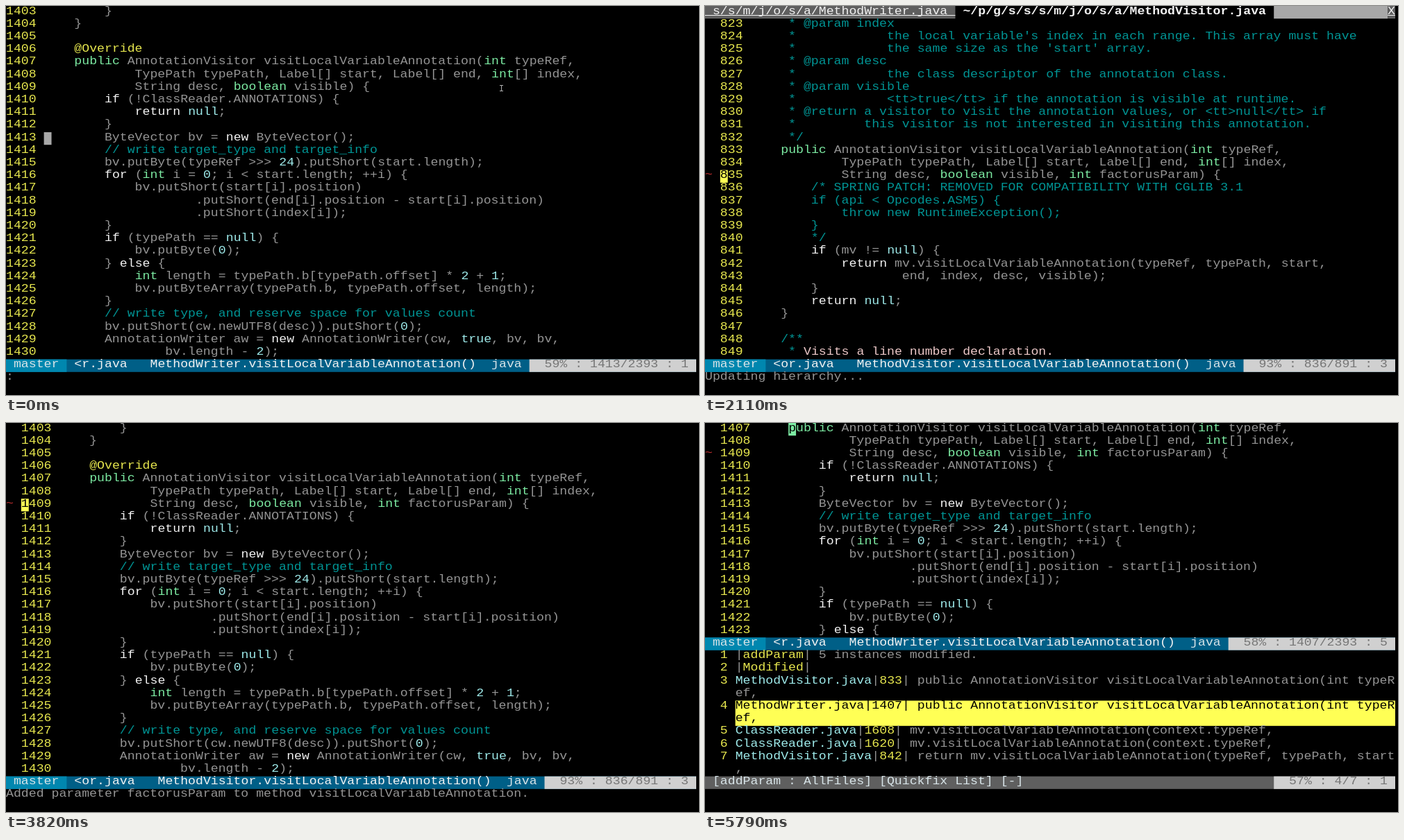
These frames come from a looping animation (998 by 561 pixels, 9900 ms). An HTML page with a canvas:

```html
<!DOCTYPE html>
<html lang="en">
<head>
<meta charset="utf-8">
<title>Editor refactoring session</title>
<style>
html, body { margin: 0; width: 100%; height: 100%; overflow: hidden; background: #000; }
canvas { display: block; width: 998px; height: 561px; }
</style>
</head>
<body>
<canvas id="term" width="998" height="561"></canvas>
<script>
const ctx = document.getElementById('term').getContext('2d');
const LOOP = 9900, COLS = 91, CW = 994 / COLS, RH = 546 / 30, BASE = 11.5;
const ASPECT = 0.92; // the terminal's pixels are wider than tall
const FONT = '18.2px "Liberation Mono", "Courier New", monospace';
const C = {
  text: '#949494', num: '#e6e64e', key: '#f2f2f2', type: '#7ceaa2', lit: '#9eeaea',
  note: '#009494', title: '#ecc8c8', sign: '#b82c2c', cursor: '#a8a8a8', black: '#000000',
  mark: '#ffff55', teal: '#0087af', blue: '#005f87', pale: '#d0d0d0', dim: '#767676',
  grey: '#5f5f5f', bar: '#d8e4e8'
};

const writerCode = `        }
    }

    @Override
    public AnnotationVisitor visitLocalVariableAnnotation(int typeRef,
            TypePath typePath, Label[] start, Label[] end, int[] index,
            String desc, boolean visible) {
        if (!ClassReader.ANNOTATIONS) {
            return null;
        }
        ByteVector bv = new ByteVector();
        // write target_type and target_info
        bv.putByte(typeRef >>> 24).putShort(start.length);
        for (int i = 0; i < start.length; ++i) {
            bv.putShort(start[i].position)
                    .putShort(end[i].position - start[i].position)
                    .putShort(index[i]);
        }
        if (typePath == null) {
            bv.putByte(0);
        } else {
            int length = typePath.b[typePath.offset] * 2 + 1;
            bv.putByteArray(typePath.b, typePath.offset, length);
        }
        // write type, and reserve space for values count
        bv.putShort(cw.newUTF8(desc)).putShort(0);
        AnnotationWriter aw = new AnnotationWriter(cw, true, bv, bv,
                bv.length - 2);`.split('\n');
const editedCode = writerCode.map(s => s.replace('visible)', 'visible, int factorusParam)'));

const visitorCode = `     * @param index
     *            the local variable's index in each range. This array must have
     *            the same size as the 'start' array.
     * @param desc
     *            the class descriptor of the annotation class.
     * @param visible
     *            <tt>true</tt> if the annotation is visible at runtime.
     * @return a visitor to visit the annotation values, or <tt>null</tt> if
     *         this visitor is not interested in visiting this annotation.
     */
    public AnnotationVisitor visitLocalVariableAnnotation(int typeRef,
            TypePath typePath, Label[] start, Label[] end, int[] index,
            String desc, boolean visible, int factorusParam) {
        /* SPRING PATCH: REMOVED FOR COMPATIBILITY WITH CGLIB 3.1
        if (api < Opcodes.ASM5) {
            throw new RuntimeException();
        }
        */
        if (mv != null) {
            return mv.visitLocalVariableAnnotation(typeRef, typePath, start,
                    end, index, desc, visible);
        }
        return null;
    }

    /**
     *`.split('\n');

const decl = 'public AnnotationVisitor visitLocalVariableAnnotation(int typeR';
const call = 'mv.visitLocalVariableAnnotation(context.typeRef,';
// file, line, text, wrapped rest
const fixes = [
  ['', 'addParam', '5 instances modified.'],
  ['', 'Modified', ''],
  ['MethodVisitor.java', '833', decl, 'ef,'],
  ['MethodWriter.java', '1407', decl, 'ef,'],
  ['ClassReader.java', '1608', call],
  ['ClassReader.java', '1620', call],
  ['MethodVisitor.java', '842', 'return mv.visitLocalVariableAnnotation(typeRef, typePath, start', ',']
];

function fill(col, row, cols, color, rows = 1) {
  ctx.fillStyle = color;
  ctx.fillRect(col * CW, row * RH, cols * CW, rows * RH);
}

function put(col, row, str, color = C.text, bold = false) {
  ctx.save();
  ctx.font = (bold ? 'bold ' : '') + FONT;
  ctx.fillStyle = color;
  ctx.translate(col * CW, row * RH + BASE);
  ctx.scale(1, ASPECT);
  ctx.fillText(str, 0, 0);
  ctx.restore();
}

function cursor(col, row, ch = '', color = C.cursor) {
  fill(col, row, 1, color);
  put(col, row, ch, C.black);
}

function underline(col, row, cols) {
  ctx.fillStyle = C.key;
  ctx.fillRect(col * CW, row * RH + 13, cols * CW, 1);
}

const TOKEN = /(\/\/.*)|(@\w+)|\b(if|else|for|return|new|throw)\b|\b(public|int|boolean)\b|\b(null|true|\d+)\b/g;
const TOKEN_COLORS = [C.note, C.num, C.key, C.type, C.lit];

function java(col, row, line) {
  let at = 0;
  for (const m of line.matchAll(TOKEN)) {
    put(col + at, row, line.slice(at, m.index));
    put(col + m.index, row, m[0], TOKEN_COLORS[m.slice(1).findIndex(Boolean)]);
    at = m.index + m[0].length;
  }
  put(col + at, row, line.slice(at));
}

function writer(lines, first, rows, margin) {
  for (let r = 0; r < rows; r++) {
    const n = first + r;
    put(margin, r, String(n), C.num);
    java(margin + 5, r, lines[n - 1403]);
  }
  if (margin) put(0, 1409 - first, '~', C.sign);
}

function visitor() {
  fill(0, 0, 33, C.grey);
  put(1, 0, 's/s/m/j/o/s/a/MethodWriter.java', C.key);
  underline(0, 0, 33);
  put(34, 0, '~/p/g/s/s/s/m/j/o/s/a/MethodVisitor.java', C.key, true);
  fill(75, 0, 15, C.cursor);
  fill(90, 0, 1, C.grey);
  put(90, 0, 'X', C.key);
  underline(90, 0, 1);
  visitorCode.forEach((line, i) => {
    const n = 823 + i, row = i + 1;
    put(2, row, String(n), C.num);
    if (n < 833 || (n > 835 && n < 841) || n > 847) put(6, row, line, C.note);
    else java(6, row, line);
  });
  put(13, 27, 'Visits a line number declaration.', C.title);
  put(0, 13, '~', C.sign);
  status(28, '<or.java', 'MethodVisitor', '93% : 836/891 : 3');
}

// Right-aligned position box; returns its first column.
function position(row, str) {
  const col = COLS - str.length - 3;
  fill(col, row, COLS - col, C.pale);
  put(col + 2, row, str, C.dim);
  return col;
}

function status(row, file, cls, pos) {
  fill(0, row, COLS, C.blue);
  fill(0, row, 8, C.teal);
  put(1, row, 'master', C.bar);
  put(9, row, file, C.key);
  put(12 + file.length, row, cls + '.visitLocalVariableAnnotation()', C.key);
  put(position(row, pos) - 5, row, 'java', C.bar);
}

function quickfix(selected) {
  let row = 18;
  fixes.forEach(([file, mark, text, rest], i) => {
    const on = i === selected, ink = c => on ? C.black : c;
    put(2, row, String(i + 1), C.num);
    if (on) fill(4, row, COLS - 4, C.mark, rest ? 2 : 1);
    let col = 4;
    for (const [s, c] of [[file, C.lit], ['|', C.text], [mark, C.num], ['|', C.text], [' ' + text, C.text]]) {
      put(col, row, s, ink(c));
      col += s.length;
    }
    row++;
    if (rest) put(4, row++, rest, ink(C.text));
  });
}

function mouse() {
  ctx.strokeStyle = '#b0b0b0';
  ctx.lineWidth = 1;
  ctx.beginPath();
  ctx.moveTo(711, 114.5); ctx.lineTo(716, 114.5);
  ctx.moveTo(713.5, 114); ctx.lineTo(713.5, 123);
  ctx.moveTo(711, 122.5); ctx.lineTo(716, 122.5);
  ctx.stroke();
}

function typing(t) {
  writer(writerCode, 1403, 28, 0);
  status(28, '<r.java', 'MethodWriter', '59% : 1413/2393 : 1');
  const cmd = t < 1020 ? ':' : t < 1160 ? ':F' : t < 1440 ? ':FRollback' : ':FAddParam factorusParam int 0';
  put(0, 29, cmd);
  if (t < 660) {
    cursor(5, 10);
    mouse();
  } else if (t >= 710 && t < 1700) cursor(cmd.length, 29);
  else if (t >= 1940) cursor(0, 29, ':');
}

function updating(t) {
  visitor();
  const msg = t < 3090 ? 'Updating hierarchy...' : 'Updating references...';
  put(0, 29, msg);
  if (t < 3090) cursor(2, 13, '8', C.mark);
  else cursor(msg.length, 29);
}

function added(t) {
  writer(editedCode, 1403, 28, 2);
  cursor(2, 6, '1', C.mark);
  status(28, '<or.java', 'MethodVisitor', '93% : 836/891 : 3');
  if (t >= 3770) put(0, 29, 'Added parameter factorusParam to method visitLocalVariableAnnotation.');
}

function browsing(t) {
  writer(editedCode, 1407, 17, 2);
  const step = [4810, 5050, 5420].filter(s => t >= s).length;
  fill(0, 17, COLS, C.grey);
  put(1, 17, 'MethodWriter.java', C.bar);
  put(position(17, '59% : 1413/2393 : 1') - 5, 17, 'java', C.bar);
  quickfix(0);
  if (step === 0) {
    fill(4, 18, 1, C.black);
    put(4, 18, '|', C.num);
  } else if (step === 1) cursor(4, 19, '|');
  else cursor(4, step === 2 ? 20 : 22, 'M', C.lit);
  fill(0, 28, COLS, C.blue);
  fill(0, 28, 10, C.pale);
  put(1, 28, 'Quickfix', C.dim);
  fill(10, 28, 21, C.teal);
  put(11, 28, 'addParam : AllFiles', C.bar);
  position(28, `${Math.floor((step + 1) * 100 / 7)}% : ${step + 1}/7 : 1`);
}

function jumped() {
  writer(editedCode, 1407, 17, 2);
  cursor(11, 0, 'p', C.type);
  status(17, '<r.java', 'MethodWriter', '58% : 1407/2393 : 5');
  quickfix(3);
  fill(0, 28, COLS, C.grey);
  put(1, 28, '[addParam : AllFiles] [Quickfix List] [-]', C.bar);
  position(28, '57% : 4/7 : 1');
}

const scenes = [[2110, typing], [3710, updating], [3900, added], [5790, browsing], [LOOP, jumped]];
const start = performance.now();

function frame() {
  const t = (performance.now() - start) % LOOP;
  ctx.fillStyle = C.black;
  ctx.fillRect(0, 0, 998, 561);
  scenes.find(([end]) => t < end)[1](t);
  requestAnimationFrame(frame);
}
frame();
</script>
</body>
</html>
```
